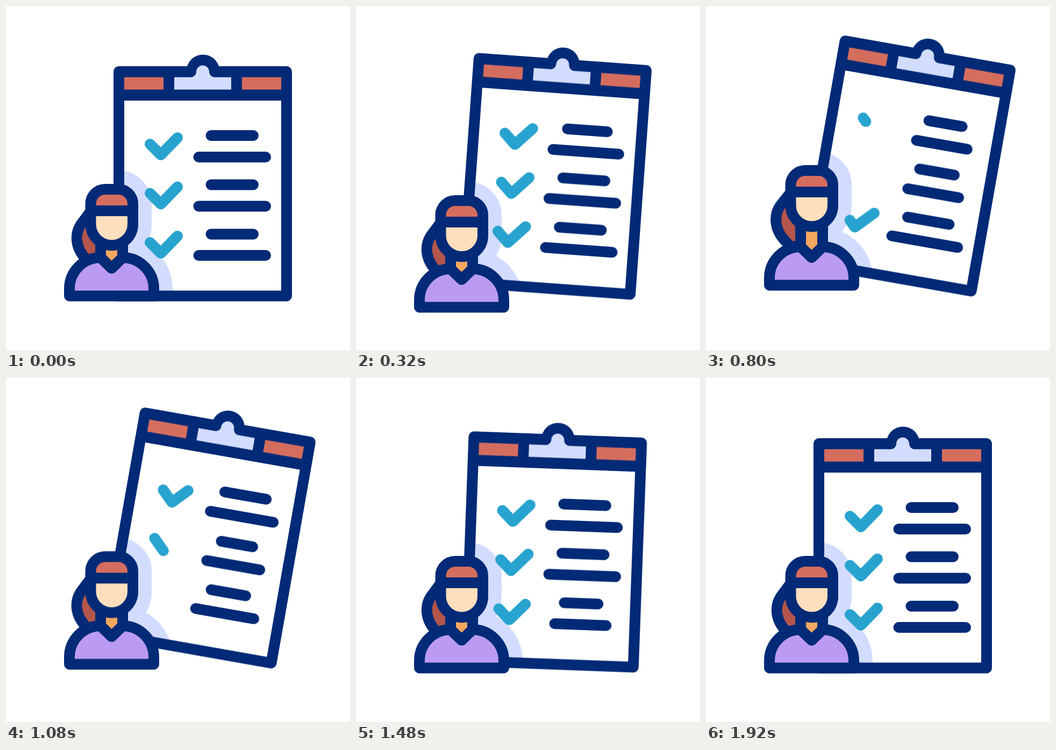
An HTML page for the animation above (1960 ms loop, 640 by 640 pixels).

```html
<!DOCTYPE html>
<html lang="en">
<head>
<meta charset="utf-8">
<title>Checklist</title>
<style>
  html, body { margin: 0; width: 100%; height: 100%; overflow: hidden; background: #fff; }
  svg { display: block; width: 100vw; height: 100vh; }

  .ink { stroke: #022a76; stroke-width: 20; stroke-linejoin: round; }
  .none { fill: none; }
  .navy { fill: #022a76; }
  .red { fill: #d56d5e; }
  .pale { fill: #d2dcfe; }
  .halo { fill: #d2dcfe; stroke: #d2dcfe; stroke-width: 70; stroke-linejoin: round; }

  .tilt, .untilt, .bob, .neck, .swing, .line, .check {
    animation: 1960ms cubic-bezier(.333, 0, .667, 1) infinite;
  }

  .tilt, .untilt { transform-origin: 560px 372px; }
  .tilt { --turn: 10deg; animation-name: tilt; }
  .untilt { --turn: -10deg; animation-name: tilt; }
  @keyframes tilt {
    0%, 9.18%, 81.6%, 100% { transform: rotate(0deg); }
    25.5%, 61.2% { transform: rotate(var(--turn)); }
  }

  .bob { animation-name: bob; }
  @keyframes bob {
    0%, 2%, 61.2%, 100% { transform: translateY(0); }
    16.3% { transform: translateY(21px); }
    30.6%, 45.9% { transform: translateY(-20px); }
  }
  .neck { animation-name: neck; }
  @keyframes neck {
    0%, 21.4%, 58.2%, 100% { transform: translateY(0); }
    36.7%, 43.9% { transform: translateY(-15px); }
  }
  .swing { transform-origin: 157px 384px; animation-name: swing; }
  @keyframes swing {
    0%, 21.4%, 58.2%, 100% { transform: rotate(0deg); }
    36.7%, 43.9% { transform: rotate(2deg); }
  }

  /* Lines shrink towards their middle. */
  .line {
    fill: none; stroke: #022a76; stroke-width: 20; stroke-linecap: round;
    stroke-dasharray: 100 200;
  }
  .short { --dash: 75; --shift: -12.5; }
  .long { --dash: 77; --shift: -11.5; }
  .a1 { animation-name: a1; }
  .a2 { animation-name: a2; }
  .b1 { animation-name: b1; }
  .b2 { animation-name: b2; }
  .c1 { animation-name: c1; }
  .c2 { animation-name: c2; }
  @keyframes a1 {
    0%, 10.8%, 54.4%, 100% { stroke-dasharray: 100 200; stroke-dashoffset: 0; }
    30%, 35.3% { stroke-dasharray: var(--dash) 200; stroke-dashoffset: var(--shift); }
  }
  @keyframes a2 {
    0%, 13.3%, 60.7%, 100% { stroke-dasharray: 100 200; stroke-dashoffset: 0; }
    34.7%, 41.3% { stroke-dasharray: var(--dash) 200; stroke-dashoffset: var(--shift); }
  }
  @keyframes b1 {
    0%, 21.3%, 73.5%, 100% { stroke-dasharray: 100 200; stroke-dashoffset: 0; }
    53.3% { stroke-dasharray: var(--dash) 200; stroke-dashoffset: var(--shift); }
  }
  @keyframes b2 {
    0%, 25.5%, 69.9%, 100% { stroke-dasharray: 100 200; stroke-dashoffset: 0; }
    41.8%, 50.3% { stroke-dasharray: var(--dash) 200; stroke-dashoffset: var(--shift); }
  }
  @keyframes c1 {
    0%, 43.4%, 89.1%, 100% { stroke-dasharray: 100 200; stroke-dashoffset: 0; }
    62.5%, 70% { stroke-dasharray: var(--dash) 200; stroke-dashoffset: var(--shift); }
  }
  @keyframes c2 {
    0%, 44.9%, 95.9%, 100% { stroke-dasharray: 100 200; stroke-dashoffset: 0; }
    65.3%, 76.5% { stroke-dasharray: var(--dash) 200; stroke-dashoffset: var(--shift); }
  }

  /* Ticks are wiped out from the start, then drawn again. */
  .check {
    fill: none; stroke: #28a3cf; stroke-width: 20;
    stroke-linecap: round; stroke-linejoin: round;
    stroke-dasharray: 100 102;
  }
  .k1 { animation-name: k1; }
  .k2 { animation-name: k2; }
  .k3 { animation-name: k3; }
  @keyframes k1 {
    0%, 17.9% { stroke-dashoffset: 0; }
    32.7%, 35.4% { stroke-dashoffset: -101; }
    59.9%, 100% { stroke-dashoffset: -202; }
  }
  @keyframes k2 {
    0%, 24.5% { stroke-dashoffset: 0; }
    39.3%, 44.6% { stroke-dashoffset: -101; }
    69.1%, 100% { stroke-dashoffset: -202; }
  }
  @keyframes k3 {
    0%, 37% { stroke-dashoffset: 0; }
    51.8%, 53.8% { stroke-dashoffset: -101; }
    78.3%, 100% { stroke-dashoffset: -202; }
  }
</style>
</head>
<body>
<svg viewBox="0 0 640 640" xmlns="http://www.w3.org/2000/svg">
  <defs>
    <clipPath id="paper"><rect x="210" y="122" width="312" height="417"/></clipPath>
    <path id="head" d="M157.5 368a27 27 0 0 1 27-27h24.500a27 27 0 0 1 27 27V406a39.250 39.250 0 0 1-78.500 0Z"/>
    <path id="torso" d="M118 539.500V526a58 58 0 0 1 58-58H217a58 58 0 0 1 58 58V539.500Z"/>
  </defs>

  <g class="tilt">
    <rect x="210" y="122" width="312" height="417" fill="#fff"/>
    <g clip-path="url(#paper)">
      <g class="untilt">
        <g class="bob">
          <use href="#head" class="halo neck"/>
          <use href="#torso" class="halo"/>
        </g>
      </g>
    </g>
    <rect class="navy" x="210" y="122" width="312" height="54"/>
    <rect class="red" x="220" y="132.500" width="73" height="23"/>
    <rect class="red" x="439" y="132.500" width="73" height="23"/>
    <rect class="ink none" x="210" y="122" width="312" height="417.500"/>
    <circle class="navy" cx="366.500" cy="121.500" r="31"/>
    <path class="pale" d="M313 155.500V132.500H344a10 10 0 0 0 10-10a12 12 0 0 1 24 0a10 10 0 0 0 10 10H419V155.500Z"/>

    <path class="check k1" pathLength="100" d="M268 257l20 20 31-32"/>
    <path class="check k2" pathLength="100" d="M268 348.500l20 20 31-32"/>
    <path class="check k3" pathLength="100" d="M268 440l20 20 31-32"/>

    <path class="line short a1" pathLength="100" d="M381.500 241H460"/>
    <path class="line long a2" pathLength="100" d="M358.500 281H483"/>
    <path class="line short b1" pathLength="100" d="M381.500 332.500H460"/>
    <path class="line long b2" pathLength="100" d="M358.500 372.500H483"/>
    <path class="line short c1" pathLength="100" d="M381.500 424.500H460"/>
    <path class="line long c2" pathLength="100" d="M358.500 464H483"/>
  </g>

  <g class="bob">
    <g class="neck">
      <path class="ink swing" fill="#b5564c" d="M156 384L139 407C128 424 128 450 150 472L160 482H180V400Z"/>
    </g>
    <path class="ink" fill="#f5a860" d="M176 420V468L196.500 488 217 468V420Z"/>
    <use href="#torso" class="ink" fill="#bb9bf2"/>
    <path fill="#f5a860" d="M186 420H207V464L196.500 474 186 464Z"/>
    <path class="ink none" d="M176 420V468L196.500 488 217 468V420"/>
    <g class="neck">
      <use href="#head" fill="#fddfbd"/>
      <path class="red" d="M157.500 381V368a27 27 0 0 1 27-27h24.500a27 27 0 0 1 27 27V381Z"/>
      <path class="ink none" d="M157.500 381H236"/>
      <use href="#head" class="ink none"/>
    </g>
  </g>
</svg>
</body>
</html>
```
